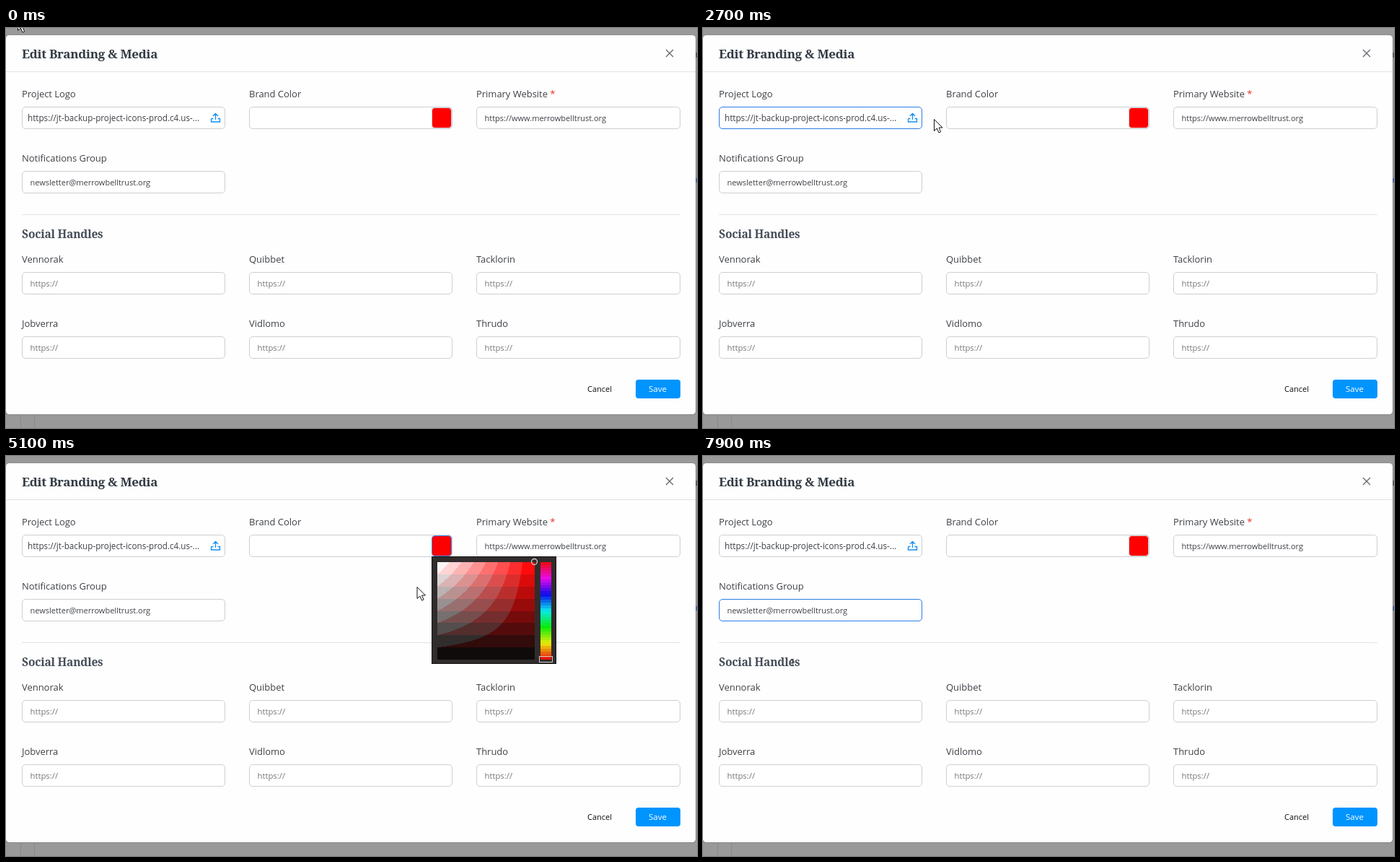
Write an HTML page with a canvas that moves like this. It is 958 by 554 pixels and loops after 8 s.

```html
<!DOCTYPE html>
<html lang="en">
<head>
<meta charset="utf-8">
<title>Edit Branding &amp; Media</title>
<style>
  html, body { margin: 0; width: 100%; height: 100%; overflow: hidden; background: #999; }
  #stage { position: relative; width: 958px; height: 554px; overflow: hidden; }
  svg { position: absolute; left: 0; top: 0; display: block; }
  text { font-family: "Open Sans", "Noto Sans", sans-serif; fill: #3e4147; }
  .head { font-family: "Noto Serif", serif; font-weight: 700; }
  .title { font-size: 17px; letter-spacing: -.3px; fill: #333b44; }
  .section { font-size: 15.5px; letter-spacing: -.2px; fill: #444c57; }
  .label { font-size: 13px; font-weight: 500; letter-spacing: -.03px; }
  .value { font-size: 11px; }
  .long { font-size: 11.7px; }
  .hint { font-size: 11.3px; fill: #75777b; }
  .field { fill: #fff; stroke: #cdcfd3; }
  #picker { position: absolute; left: 590px; top: 139px; transform-origin: 0 0; }
</style>
</head>
<body>
<div id="stage">
  <svg id="form" width="958" height="554">
    <rect width="958" height="554" fill="#999"/>
    <path d="M20.5 535v19M39.5 535v19" stroke="#8b8b8b"/>
    <path d="M957 34v7" stroke="#555" stroke-width="2"/>
    <path d="M957 208v6" stroke="#3c5fa8" stroke-width="2"/>
    <rect x="-.5" y="9.5" width="957" height="526.5" rx="5" fill="#858585"/>
    <rect y="10" width="956" height="525" rx="4.5" fill="#fefefe"/>
    <path d="M0 60.5H956M22 258.5H935" stroke="#e2e3e5"/>
    <path d="M915 30l10 10M925 30l-10 10" stroke="#666a70" stroke-width="1.4"/>
    <text class="head title" x="22" y="42">Edit Branding &amp; Media</text>
    <text class="head section" x="22" y="291">Social Handles</text>
    <g id="fields"></g>
    <path d="M284.5 125.5v4.5h12v-4.500h-3M284.500 125.500h3M290.500 127v-8M287 122l3.500-3.500 3.500 3.500" fill="none" stroke="#1190f5" stroke-width="1.300"/>
    <rect id="swatch" x="590.5" y="110.500" width="27" height="28" rx="4" fill="#f00" stroke="#d3d5d9"/>
    <text x="806" y="504" class="value" style="fill:#111">Cancel</text>
    <rect x="873" y="487" width="62" height="26" rx="4" fill="#0094ff"/>
    <text x="891" y="504" style="font-size:11.500px;fill:#fff">Save</text>
  </svg>
  <canvas id="picker" width="180" height="152"></canvas>
  <svg width="958" height="554">
    <g id="cursor">
      <path id="arrow" d="M.5.5V16.500L4.300 13 7 19 9.600 17.800 7 12H12Z" fill="#fff" stroke="#111"/>
      <path id="hand" d="M-2 12V1.500a1.700 1.700 0 0 1 3.400 0V7q3-1 3.400 1 3-.8 3.400 1.200 2.400-.4 2.600 1.800V15q-.3 3-2 5v2.500H0V20.500q-3-3.500-6-9 .2-2.500 2.600-1zM1.400 7v4M4.800 8v3M8.200 9.200V12" fill="#fff" stroke="#111"/>
      <path id="beam" d="M-2 -4.500H2M0 -4.500V4.500M-2 4.500H2" fill="none" stroke="#333" stroke-width=".9"/>
    </g>
  </svg>
</div>
<script>
const LOOP = 8000, STEP = 100;
const $ = id => document.getElementById(id);
const clamp = v => Math.max(0, Math.min(1, v));

// x, top of box, label, text, text class
const HINT = ["https://", "hint"];
const FIELDS = [
  [22, 109, "Project Logo", "https://jt-backup-project-icons-prod.c4.us-...", "long"],
  [337, 109, "Brand Color", "", "value"],
  [652, 109, "Primary Website", "https://www.merrowbelltrust.org", "value"],
  [22, 198, "Notifications Group", "newsletter@merrowbelltrust.org", "value"],
  [22, 338, "Vennorak", ...HINT],
  [337, 338, "Quibbet", ...HINT],
  [652, 338, "Tacklorin", ...HINT],
  [22, 427, "Jobverra", ...HINT],
  [337, 427, "Vidlomo", ...HINT],
  [652, 427, "Thrudo", ...HINT]
];

$("fields").innerHTML = FIELDS.map(([x, y, label, text, kind], i) => `
  <text class="label" x="${x}" y="${y - 13}">${label}${i === 2 ? ' <tspan fill="#e8342c">*</tspan>' : ""}</text>
  <rect class="field" x="${x + .5}" y="${y + .5}" width="${x === 652 ? 282 : 281}" height="30" rx="4.5"/>
  <text class="${kind}" x="${x + (i ? 11.5 : 8)}" y="${y + 20}">${text}</text>`).join("");
const boxes = [...document.querySelectorAll(".field")];

// Field index, time the highlight comes on, time it goes off
const HIGHLIGHTS = [[0, 1250, 2700], [1, 3050, 3530], [2, 5500, 7100], [3, 6550, 9000]];

// Time, x, y, shape
const PATH = [
  [0, 16, -13, "arrow"],
  [100, 16, -13, "arrow"],
  [500, 90, 20, "arrow"],
  [1000, 225, 80, "arrow"],
  [1300, 268, 112, "arrow"],
  [1600, 280, 116, "arrow"],
  [1800, 284, 123, "hand"],
  [2000, 284, 123, "hand"],
  [2200, 285, 123, "hand"],
  [2500, 285, 123, "hand"],
  [2700, 320, 126, "arrow"],
  [3000, 470, 124, "beam"],
  [3300, 582, 126, "beam"],
  [3500, 582, 126, "beam"],
  [3600, 607, 131, "hand"],
  [3800, 606, 130, "hand"],
  [4100, 603, 126, "hand"],
  [4700, 603, 126, "hand"],
  [4800, 601, 130, "hand"],
  [4900, 590, 150, "arrow"],
  [5100, 569.5, 181, "arrow"],
  [5300, 569.5, 181, "arrow"],
  [5400, 573.5, 181, "arrow"],
  [5600, 710, 148, "arrow"],
  [5700, 764, 134, "beam"],
  [5800, 764, 134, "beam"],
  [6100, 764.5, 122, "beam"],
  [6400, 764.5, 122, "beam"],
  [6600, 400, 185, "arrow"],
  [6700, 171, 215, "beam"],
  [6800, 171, 215, "beam"],
  [6900, 171, 214, "beam"],
  [7300, 171, 210, "beam"],
  [7500, 171, 210, "beam"],
  [7600, 163, 220, "beam"],
  [7700, 150, 240, "arrow"],
  [7800, 134, 266, "arrow"],
  [7900, 124, 286, "beam"]
];

function mix(k) {
  const from = [205, 207, 211], to = [43, 123, 232];
  return `rgb(${from.map((c, i) => Math.round(c + (to[i] - c) * k))})`;
}

function paintPicker() {
  const g = $("picker").getContext("2d"), size = 135;
  g.fillStyle = "#151313";
  g.fillRect(0, 0, 173, 149);
  g.fillStyle = "#312d2d";
  g.fillRect(1, 1, 171, 147);
  // Saturation and value in eight levels per channel
  const level = v => Math.min(7, Math.floor(v * 8));
  for (let y = 0; y < size; y++) {
    for (let x = 0; x < size; x++) {
      const v = 1 - (y + .5) / size, s = (x + .5) / size;
      const r = 16 + level(v) * 34, c = 11 + level(v * (1 - s)) * 33.5;
      g.fillStyle = `rgb(${r},${c},${c})`;
      g.fillRect(8 + x, 8 + y, 1, 1);
    }
  }
  for (let y = 0; y < size; y += 4) {
    g.fillStyle = `hsl(${360 - (y + 2) / size * 360},92%,48%)`;
    g.fillRect(151, 8 + y, 15, Math.min(4, size - y));
  }
  g.strokeStyle = "#d5cccc";
  g.lineWidth = 1.3;
  g.beginPath();
  g.arc(142.5, 7.5, 4, 0, 7);
  g.stroke();
  g.lineWidth = 1;
  g.strokeRect(149.5, 138.5, 18, 8);
}

function cursorAt(t) {
  let i = PATH.length - 1;
  while (PATH[i][0] > t) i--;
  const a = PATH[i], b = PATH[i + 1] || a;
  const k = b === a ? 0 : (t - a[0]) / (b[0] - a[0]);
  return [a[1] + (b[1] - a[1]) * k, a[2] + (b[2] - a[2]) * k, a[3]];
}

function draw(time) {
  const t = Math.floor(time % LOOP / STEP) * STEP;
  for (const [i, on, off] of HIGHLIGHTS) {
    const k = clamp((t - on) / 150) * (1 - clamp((t - off) / 150));
    boxes[i].style.stroke = mix(k);
  }

  const open = t >= 4400 && t < 5300, opening = t === 4400;
  const picker = $("picker").style;
  picker.visibility = open ? "visible" : "hidden";
  picker.opacity = opening ? .95 : 1;
  picker.transform = opening ? "scale(1.006,.988)" : "none";
  $("swatch").style.stroke = open ? "#3b8cf0" : "#d3d5d9";

  const [x, y, shape] = cursorAt(t);
  $("cursor").setAttribute("transform", `translate(${x} ${y})`);
  for (const id of ["arrow", "hand", "beam"]) {
    $(id).style.display = id === shape ? "inline" : "none";
  }
}

paintPicker();
const start = performance.now();
function tick() {
  draw(performance.now() - start);
  requestAnimationFrame(tick);
}
tick();
</script>
</body>
</html>
```
